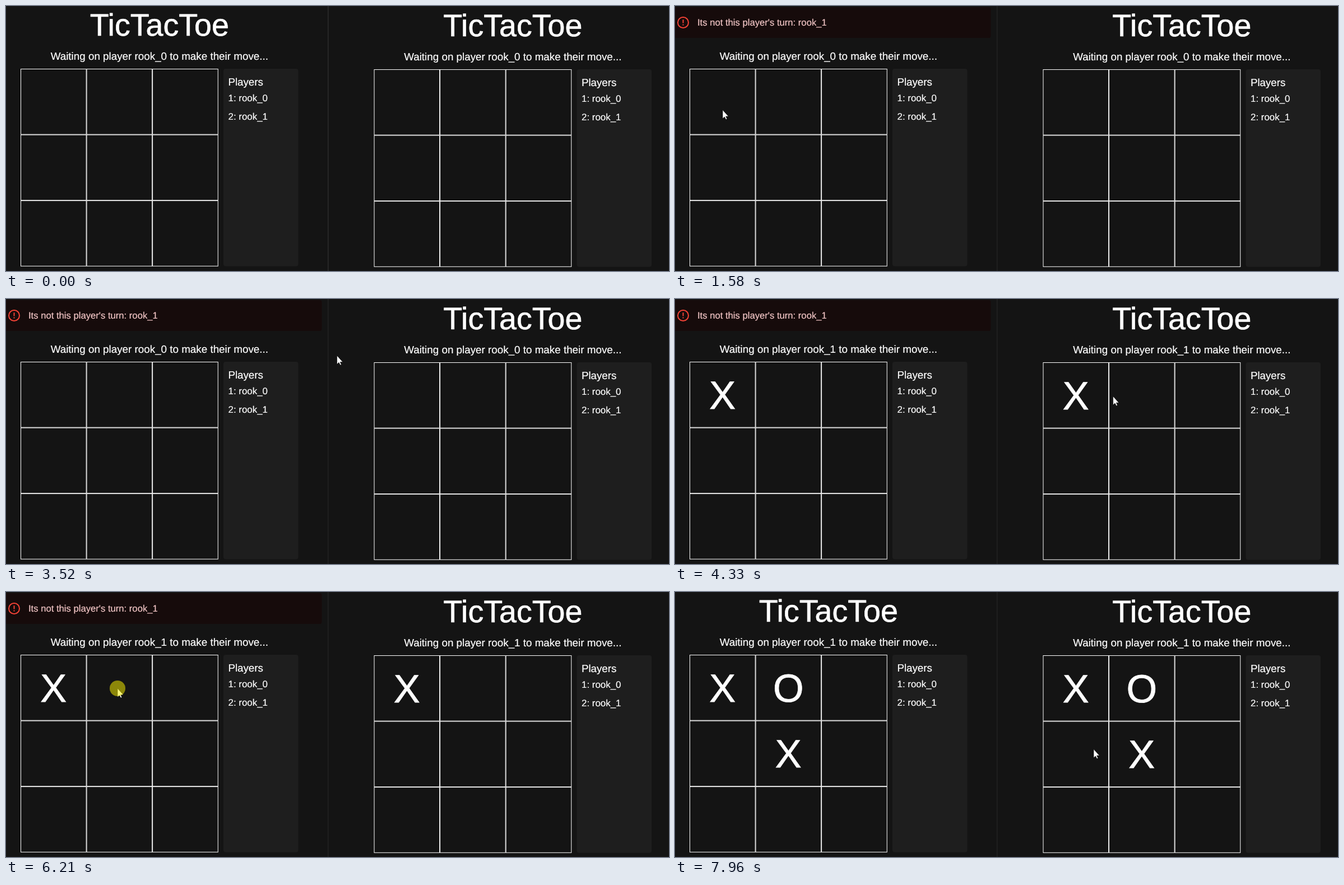
An HTML page for the animation above (8 s loop, 1183x473 px).

```html
<!DOCTYPE html>
<html lang="en">
<head>
<meta charset="utf-8">
<title>TicTacToe</title>
<style>
  html, body { margin: 0; width: 100%; height: 100%; overflow: hidden; background: #141414; }
  svg { display: block; width: 1183px; height: 473px; }
  text {
    font-family: "Liberation Sans", Arial, sans-serif;
    fill: #fff; stroke: #fff; stroke-width: .012em;
    text-rendering: geometricPrecision;
  }
  .mid { text-anchor: middle; }
  .error { fill: #f4c7c7; stroke: #f4c7c7; }
</style>
</head>
<body>
<svg id="stage" viewBox="0 0 1183 473"></svg>
<script>
const LOOP = 8000, STEPS = 12, STEP = 68.5;
const REPLY = 130, HALO = 140;
const PITCH = 117.55, SHIFT = 630.5;
const PLAYERS = ["rook_0", "rook_1"];

const svg = document.getElementById("stage");
function add(parent, tag, attrs, text) {
  const el = document.createElementNS("http://www.w3.org/2000/svg", tag);
  for (const k in attrs) el.setAttribute(k, attrs[k]);
  if (text) el.textContent = text;
  parent.appendChild(el);
  return el;
}
const show = (el, on) => el.setAttribute("visibility", on ? "visible" : "hidden");

// The first click is out of turn, the others each place a mark
const CLICKS = [1180, 3930, 6210, 7440];
const MARKS = [["X", 0, 0], ["O", 1, 0], ["X", 1, 1]].map(([symbol, col, row], i) => ({
  symbol, at: CLICKS[i + 1] + REPLY, x: 84.7 + PITCH * col, y: 195.7 + PITCH * row
}));
const TOAST_IN = CLICKS[0] + REPLY, TOAST_OUT = MARKS[1].at;

function pane(dx, dy) {
  const g = add(svg, "g", { transform: `translate(${dx} ${dy})` });
  const label = (x, y, size, text, cls = "") => add(g, "text", { x, y, "font-size": size, class: cls }, text);
  add(g, "rect", { x: 388, y: 112, width: 133.5, height: 352.5, rx: 4, fill: "#1e1e1e" });
  for (let i = 0; i < 9; i++) {
    add(g, "rect", {
      x: 26.5 + PITCH * (i % 3), y: 112.5 + PITCH * Math.floor(i / 3),
      width: PITCH - .9, height: PITCH - .9, fill: "none", stroke: "#fff"
    });
  }
  const title = label(273.8, 53, 55.6, "TicTacToe", "mid");
  const status = label(273.8, 96, 18.82, " ", "mid");
  label(396.4, 141.7, 18.75, "Players");
  PLAYERS.forEach((name, i) => label(396.6, 170.4 + 32.2 * i, 16.87, `${i + 1}: ${name}`));
  const marks = MARKS.map(m => label(m.x, m.y, 70.3, m.symbol, "mid"));
  return { title, status, marks };
}

const divider = add(svg, "rect", { x: 574, y: 0, width: 1.5, height: 473 });
const panes = [pane(0, 0), pane(SHIFT, 1)];

const toast = add(svg, "g", {});
add(toast, "path", { d: "M0 2H559.5a4 4 0 0 1 4 4V53a4 4 0 0 1-4 4H0Z", fill: "#160b0b" });
add(toast, "circle", { cx: 14.5, cy: 29.5, r: 9.5, fill: "none", stroke: "#f44336", "stroke-width": 2 });
add(toast, "path", { d: "M14.5 24.3v6.2M14.5 32.4v2.2", stroke: "#f44336", "stroke-width": 2 });
add(toast, "text", { x: 40, y: 35, "font-size": 16.65, class: "error" },
  `Its not this player's turn: ${PLAYERS[1]}`);

const cursor = add(svg, "g", {});
const arrow = add(cursor, "path", {
  d: "M0-.5V15L3.4 11.9 5.8 16.6 7.9 15.7 5.7 11H10.4Z", fill: "#fff", stroke: "#000", "stroke-width": .6
});
const beam = add(cursor, "path", {
  d: "M-3-7.5h2.2l.8.8.8-.8H3M-3 7.5h2.2l.8-.8.8.8H3M0-6.7V6.7", fill: "none", stroke: "#ddd"
});
const halo = add(cursor, "circle", { cx: 0, cy: -.5, r: 14, fill: "#f8ee00", opacity: .53 });

// Each move bends from the last resting place past a pull point to a new one
const ENTRY = [1300, 450];
const MOVES = [
  { at: 200, pull: [-270, 50], to: [85, 186] },
  { at: 2200, pull: [392, -36], to: [723, 205] },
  { at: 3030, pull: [409, 14], to: [739, 163] },
  { at: 4330, pull: [1019, 230], to: [719, 292] },
  { at: 5170, pull: [480, 310], to: [199, 172.5] },
  { at: 6620, pull: [999, 87], to: [837, 293] },
  { at: 7960, pull: [297, 221], to: [-243, 149] }
];

function locate(t) {
  const i = MOVES.filter(m => m.at <= t).length - 1;
  if (i < 0) return null;
  const from = i ? MOVES[i - 1].to : ENTRY;
  const { at, pull, to } = MOVES[i];
  const p = Math.min(1, (Math.floor((t - at) / STEP) + 1) / STEPS), q = 1 - p;
  return from.map((a, k) => q * q * a + 2 * p * q * pull[k] + p * p * to[k]);
}

// The text pointer appears over a placed mark
const overMark = ([x, y], t) => MARKS.some(m => t >= m.at && [0, SHIFT].some(dx =>
  Math.abs(x - dx - m.x) < 26 && Math.abs(y - m.y + 25) < 38));

function draw(t) {
  const turn = MARKS.filter(m => t >= m.at).length % 2;
  const line = `Waiting on player ${PLAYERS[turn]} to make their move...`;
  for (const p of panes) {
    if (p.status.textContent !== line) p.status.textContent = line;
    p.marks.forEach((m, i) => show(m, t >= MARKS[i].at));
  }
  const fade = t < TOAST_IN || t >= TOAST_OUT ? 0 : Math.min(1, .4 + (t - TOAST_IN) / 230);
  toast.setAttribute("opacity", fade);
  show(panes[0].title, fade < 1);
  divider.setAttribute("fill", t < TOAST_IN ? "#2b2b2b" : "#222");

  const pos = locate(t);
  const text = pos && overMark(pos, t);
  if (pos) cursor.setAttribute("transform", `translate(${pos})`);
  show(arrow, pos && !text);
  show(beam, text);
  show(halo, CLICKS.some(c => t >= c && t < c + HALO));
}

function tick() {
  draw(performance.now() % LOOP);
  requestAnimationFrame(tick);
}
tick();
</script>
</body>
</html>
```
